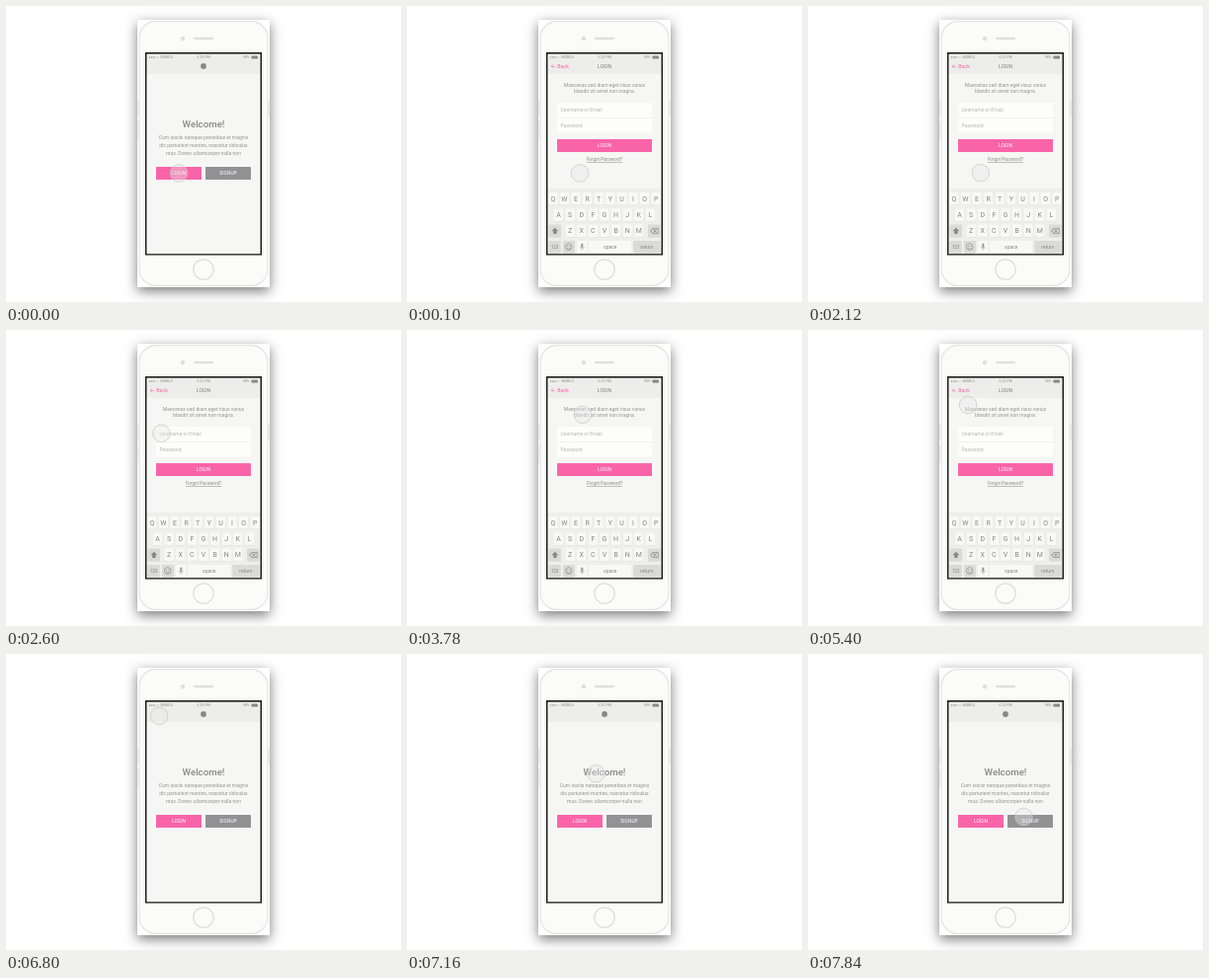
Recreate the animation shown at these times as an HTML page with a canvas. Size 400 px wide and 300 px high, loop 8000 ms.

```html
<!DOCTYPE html>
<html lang="en">
<head>
<meta charset="utf-8">
<title>Login flow</title>
<style>
html, body { margin: 0; width: 100%; height: 100%; overflow: hidden; background: #fff; }
canvas { display: block; width: 100vw; height: 100vh; }
</style>
</head>
<body>
<canvas id="stage"></canvas>
<script>
const W = 400, H = 300, MID = W / 2, LOOP = 8000;
const PINK = '#f964a8', GREY = '#929294', INK = '#949494', PALE = '#f6f6f5', BAR = '#ededec';
const KEY = '#f8f8f7', KEY_DARK = '#dadad9', KEY_INK = '#868686';
const canvas = document.getElementById('stage');
const ctx = canvas.getContext('2d');
const dpr = window.devicePixelRatio || 1;
canvas.width = W * dpr;
canvas.height = H * dpr;

// The pointer glides from place to place, bending towards "via".
const home = [175, 169.5];
const moves = [
  { at: 2120, until: 2640, via: [149, 128], to: [157.5, 104.5] },
  { at: 3560, until: 4420, via: [178, 48], to: [208.5, 151] },
  { at: 4840, until: 5060, to: [165, 81.5] },
  { at: 5340, until: 5720, to: [155, 62.5] },
  { at: 6800, until: 7840, to: [218.5, 165] }
];

function pointerAt(t) {
  let from = home;
  for (const { at, until, via, to } of moves) {
    if (t < at) break;
    const left = Math.max(0, (until - t) / (until - at));
    const u = 1 - left * left, v = 1 - u, start = from;
    from = start.map((a, k) => {
      const c = via ? via[k] : (a + to[k]) / 2;
      return v * v * a + 2 * u * v * c + u * u * to[k];
    });
  }
  return from;
}

// Opacity of the login screen over the welcome screen.
function loginAlpha(t) {
  if (t < 80 || t >= 6300) return 0;
  return t < 100 || t >= 6280 ? 0.5 : 1;
}

function box(x, y, w, h, fill, r = 0) {
  ctx.beginPath();
  ctx.roundRect(x, y, w, h, r);
  ctx.fillStyle = fill;
  ctx.fill();
}

function stroke(color, width) {
  ctx.strokeStyle = color;
  ctx.lineWidth = width;
  ctx.stroke();
}

function circle(x, y, r, fill, edge, width = 1) {
  ctx.beginPath();
  ctx.arc(x, y, r, 0, Math.PI * 2);
  if (fill) { ctx.fillStyle = fill; ctx.fill(); }
  if (edge) stroke(edge, width);
}

function text(str, x, y, size, color = INK, align = 'center', weight = 400) {
  ctx.font = `${weight} ${size}px Roboto, Inter, "DejaVu Sans", sans-serif`;
  ctx.textAlign = align;
  ctx.textBaseline = 'middle';
  ctx.fillStyle = color;
  ctx.fillText(str, x, y);
}

function paragraph(lines, y, step) {
  lines.forEach((s, i) => text(s, MID, y + i * step, 5));
}

function button(label, x, y, w, fill) {
  box(x, y, w, 13, fill, 0.6);
  text(label, x + w / 2, y + 7, 4.9, '#fff');
}

function phone() {
  ctx.save();
  ctx.shadowColor = 'rgba(0,0,0,.52)';
  ctx.shadowBlur = 12 * dpr;
  ctx.shadowOffsetY = 4 * dpr;
  box(133, 14, 134, 271, '#fff');
  ctx.restore();
  for (const y of [95, 117]) box(133.4, y, 1.4, 17, '#e8e8e7');
  box(265.2, 95, 1.4, 17, '#e8e8e7');
  box(135, 15.5, 130, 268, '#fbfbfa', 17);
  stroke('#e5e5e4', 1.3);
  circle(179, 33, 2.2, '#dededd');
  box(190, 31.8, 20, 2.2, '#dededd', 1.1);
  circle(MID, 267, 10.2, '#fbfbfa', '#dfdfde', 1.3);
  box(142, 48, 116, 204, PALE);
}

function statusBar() {
  box(142, 48, 116, 21, BAR);
  for (let i = 0; i < 5; i++) circle(145.6 + i * 2.1, 52, 0.7, i < 3 ? '#888' : '#ccc');
  text('MOBILE', 156.5, 52.2, 3.6, INK, 'left');
  text('5:23 PM', MID, 52.2, 3.7);
  text('98%', 246.5, 52.2, 3.7, INK, 'right');
  box(248.5, 50.6, 6.5, 2.9, '#888', 0.6);
}

function welcome() {
  circle(MID, 61, 2.9, '#888');
  text('Welcome!', MID, 120.2, 9.7, '#888', 'center', 500);
  paragraph(['Cum sociis natoque penatibus et magnis',
    'dis parturient montes, nascetur ridiculus',
    'mus. Donec ullamcorper nulla non'], 133.3, 7.9);
  button('LOGIN', 152, 163, 46, PINK);
  button('SIGNUP', 202, 163, 46, GREY);
}

function key(x, y, w, label, fill = KEY, size = 7) {
  box(x, y + 0.5, w, 12.6, '#dededd', 1.4);
  box(x, y, w, 12.6, fill, 1.4);
  text(label, x + w / 2, y + 6.7, size, KEY_INK);
}

function keyboard() {
  const pitch = 11.6, top = 189, step = 16.3;
  const row = i => top + i * step;
  box(142, 185, 116, 67, '#eeeeed');
  ['QWERTYUIOP', 'ASDFGHJKL', 'ZXCVBNM'].forEach((letters, r) => {
    const left = MID - letters.length * pitch / 2;
    [...letters].forEach((c, i) => key(left + i * pitch + 1.1, row(r), 9.4, c));
  });
  key(143.5, row(2), 12.5, '⬆', KEY_DARK, 8);
  key(244, row(2), 12.5, '⌫', KEY_DARK, 8);
  key(143.5, row(3), 12, '123', KEY_DARK, 4.6);
  key(158, row(3), 12, '☺', KEY_DARK, 8);
  key(172, row(3), 10.5, '');
  box(176.3, 240.6, 2, 4.4, '#999', 1);
  ctx.beginPath();
  ctx.arc(177.3, 243.8, 2.1, 0, Math.PI);
  ctx.moveTo(177.3, 245.9);
  ctx.lineTo(177.3, 247.5);
  stroke('#999', 0.5);
  key(184, row(3), 43.5, 'space', KEY, 5);
  key(229.3, row(3), 27.2, 'return', KEY_DARK, 5);
}

function login() {
  box(142, 56, 116, 13, BAR);
  box(142, 69, 116, 183, PALE);
  text('←', 145.2, 61.3, 6, PINK, 'left');
  text('Back', 152.3, 61.5, 5.3, PINK, 'left');
  text('LOGIN', MID, 61.5, 5, '#808080');
  paragraph(['Maecenas sed diam eget risus varius',
    'blandit sit amet non magna.'], 80.2, 6.8);
  box(152, 98, 96, 30.5, '#fdfdfc');
  box(152, 113, 96, 0.7, '#eee');
  text('Username or Email', 155.6, 105.7, 5, '#b4b4b4', 'left');
  text('Password', 155.6, 121.3, 5, '#b4b4b4', 'left');
  button('LOGIN', 152, 135, 96, PINK);
  text('Forgot Password?', MID, 155.8, 4.5, '#888');
  box(182, 158, 36, 0.5, '#888');
  keyboard();
}

function draw(t) {
  ctx.setTransform(dpr, 0, 0, dpr, 0, 0);
  ctx.fillStyle = '#fff';
  ctx.fillRect(0, 0, W, H);
  phone();
  statusBar();
  const alpha = loginAlpha(t);
  if (alpha < 1) welcome();
  if (alpha > 0) {
    ctx.globalAlpha = alpha;
    login();
    ctx.globalAlpha = 1;
  }
  ctx.beginPath();
  ctx.rect(141.7, 47.7, 116.6, 204.2);
  stroke('#111', 1.4);
  const [x, y] = pointerAt(t);
  circle(x, y, 8.8, 'rgba(232,232,232,.38)', 'rgba(198,198,198,.7)');
}

const start = performance.now();
function tick() {
  draw((performance.now() - start) % LOOP);
  requestAnimationFrame(tick);
}
tick();
</script>
</body>
</html>
```
